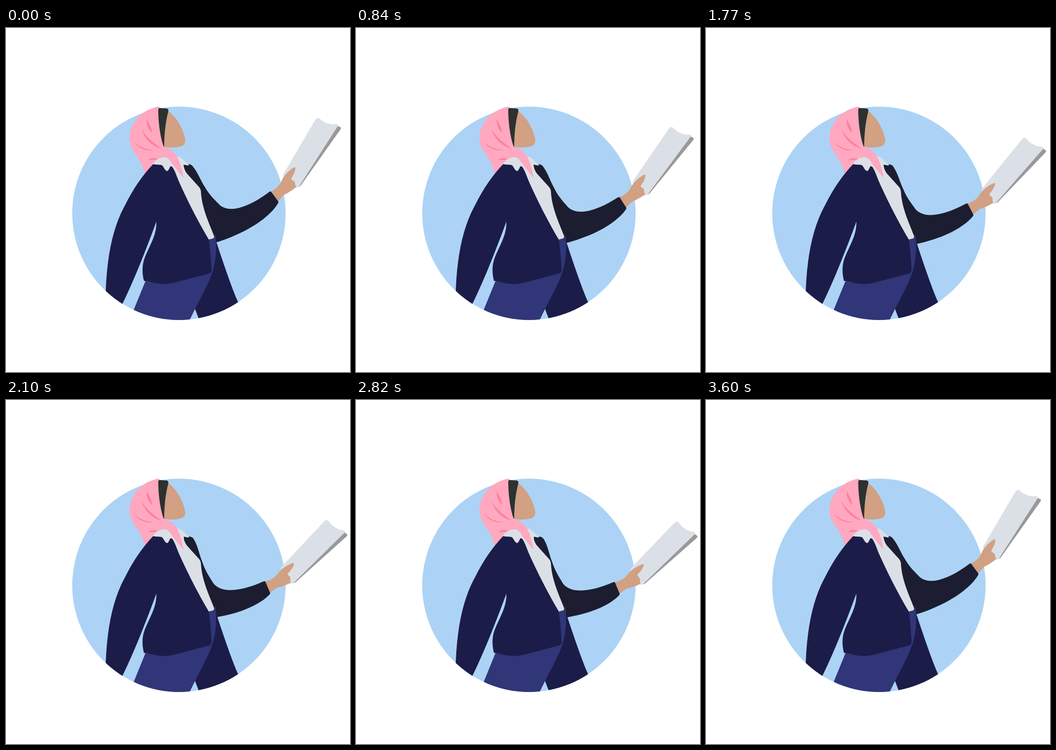
These frames come from a looping animation (748 px wide and 748 px high, 3630 ms). An HTML page:

```html
<!DOCTYPE html>
<html lang="en">
<head>
<meta charset="utf-8">
<title>Woman waving a paper</title>
<style>
html, body { margin: 0; width: 100%; height: 100%; overflow: hidden; background: #fff; }
svg { display: block; width: 100vw; height: 100vh; }
</style>
</head>
<body>
<svg viewBox="0 0 748 748" preserveAspectRatio="xMidYMid meet">
  <defs>
    <clipPath id="disc"><circle cx="376" cy="403" r="232"/></clipPath>
  </defs>
  <circle cx="376" cy="403" r="232" fill="#acd3f5"/>

  <!-- rear leg -->
  <g clip-path="url(#disc)">
    <path fill="#1c1c49" d="M457 464C469 500 491 567 506 599L500 650H426L411 611L440 500Z"/>
  </g>

  <g id="arm">
    <path fill="#999" d="M721 213L728 216Q729 218 727 221L642 341Q639 346 634 345Z"/>
    <path fill="#dbe0e7" d="M603 318L673 199Q677 193 682 197C693 207 706 211 718 209Q723 210 721 214L637 345Q633 349 629 346L604 326Q602 322 603 318Z"/>
    <path fill="#d2a083" d="M574 357C587 350 595 343 599 333C603 322 616 309 626 303Q630 302 629 307C628 315 623 323 620 328C623 333 627 332 628 336Q629 342 631 346C622 353 611 360 604 363L591 378Z"/>
    <path fill="#1c1d31" d="M383 297L398 296Q404 297 407 302C417 314 424 333 432 345C441 361 451 371 462 382C471 393 489 396 507 391C533 384 554 370 573 356Q576 354 578 358L592 377Q593 379 591 382C577 405 546 428 513 444C494 453 475 461 457 466L436 469L400 380Z"/>
  </g>

  <!-- shirt and right collar -->
  <path fill="#dbe0e7" d="M352 287L372 280Q378 279 382 283L397 297Q399 299 396 299L386 297Q387 308 393 316L420 346Q424 351 424 358C426 391 441 423 452 451Q454 456 450 458L438 461L372 345Z"/>

  <!-- trousers -->
  <g clip-path="url(#disc)">
    <path fill="#303677" d="M305 546L274 622L300 650H392L411 611C431 573 447 543 452 519C458 494 458 470 455 447L453 457L441 460L430 520Z"/>
  </g>

  <!-- head -->
  <path fill="#d2a083" d="M351 180C370 191 387 221 390 245Q389 256 378 258Q361 262 342 258Z"/>
  <path fill="#2d312f" d="M330 178Q330 173 335 174L349 175Q354 176 353 181C347 203 344 232 344 258L340 257C333 232 329 203 330 178Z"/>
  <path fill="#ffa8c0" d="M334 172Q329 170 320 174C305 179 292 187 283 199C270 216 266 236 270 252C275 273 299 289 300 316L328 300L353 282C361 296 374 311 386 326C384 312 379 292 371 278C365 268 357 263 343 258C336 240 331 206 331 177Z"/>
  <g fill="#fd8299">
    <path d="M306 198C311 209 318 216 317 228C309 220 305 209 306 198Z"/>
    <path d="M295 220C305 239 323 251 338 262C318 258 300 240 295 220Z"/>
    <path d="M278 247C290 259 305 265 320 265C306 269 288 262 278 247Z"/>
    <path d="M309 287C314 282 325 281 331 286C323 286 317 288 309 287Z"/>
  </g>

  <!-- left collar and jacket -->
  <path fill="#dbe0e7" d="M318 297C325 286 335 281 346 281Q352 282 355 288L363 303L350 314L334 304Z"/>
  <g clip-path="url(#disc)">
    <path fill="#1c1c49" d="M320 296C328 298 335 296 340 299C344 304 346 311 351 311Q354 309 357 301Q361 300 363 304C369 314 372 325 377 336C390 365 412 411 441 460C444 482 446 504 447 525Q447 532 441 534L365 554Q348 558 333 556C320 555 311 549 300 550C296 535 296 520 299 508C307 480 328 455 327 421C309 470 280 546 252 602L216.500 590C217.500 505 231 435 259 385C277 349 297 320 320 296Z"/>
  </g>
</svg>
<script>
const LOOP = 3630, HOLD = 600, TICK = 30;
const MID = 6.7, TOP = 13.6, LAST = 85;
const PX = 392, PY = 318;
const parts = [...document.querySelectorAll("#arm path")]
  .map(el => ({ el, rest: el.getAttribute("d") }));

// Arm angle in degrees: up to MID, on to TOP, then an accelerating return.
function angle(s) {
  if (s < 18) return MID * (1 - Math.pow(1 - s / 18, 1.5));
  if (s < 27) return MID;
  if (s < 48) return MID + (TOP - MID) * (1 - Math.cos(Math.PI * (s - 27) / 21)) / 2;
  if (s < 61) return TOP;
  return TOP * (1 - Math.pow((s - 61) / (LAST - 61), 1.5));
}

// Turn a point about the shoulder; the upper arm follows a little less.
function turn(x, y, deg) {
  const dx = x - PX, dy = y - PY, r = Math.hypot(dx, dy);
  const a = deg * Math.PI / 180 * (1 - 0.25 * Math.exp(-((r / 110) ** 2)));
  const c = Math.cos(a), s = Math.sin(a);
  return (PX + dx * c - dy * s).toFixed(2) + " " + (PY + dx * s + dy * c).toFixed(2);
}

// The pose advances five times in every six ticks.
function stepAt(t) {
  if (t < HOLD) return 0;
  const n = Math.floor((t - HOLD) / TICK) + 1;
  return Math.min(LAST, Math.ceil(n * 5 / 6));
}

function draw(t) {
  const deg = angle(stepAt(t % LOOP));
  for (const { el, rest } of parts) {
    el.setAttribute("d", rest.replace(/(\d+) (\d+)/g, (m, x, y) => turn(+x, +y, deg)));
  }
}

let start;
function loop(now) {
  if (start === undefined) start = now;
  draw(now - start);
  requestAnimationFrame(loop);
}
draw(0);
requestAnimationFrame(loop);
</script>
</body>
</html>
```
